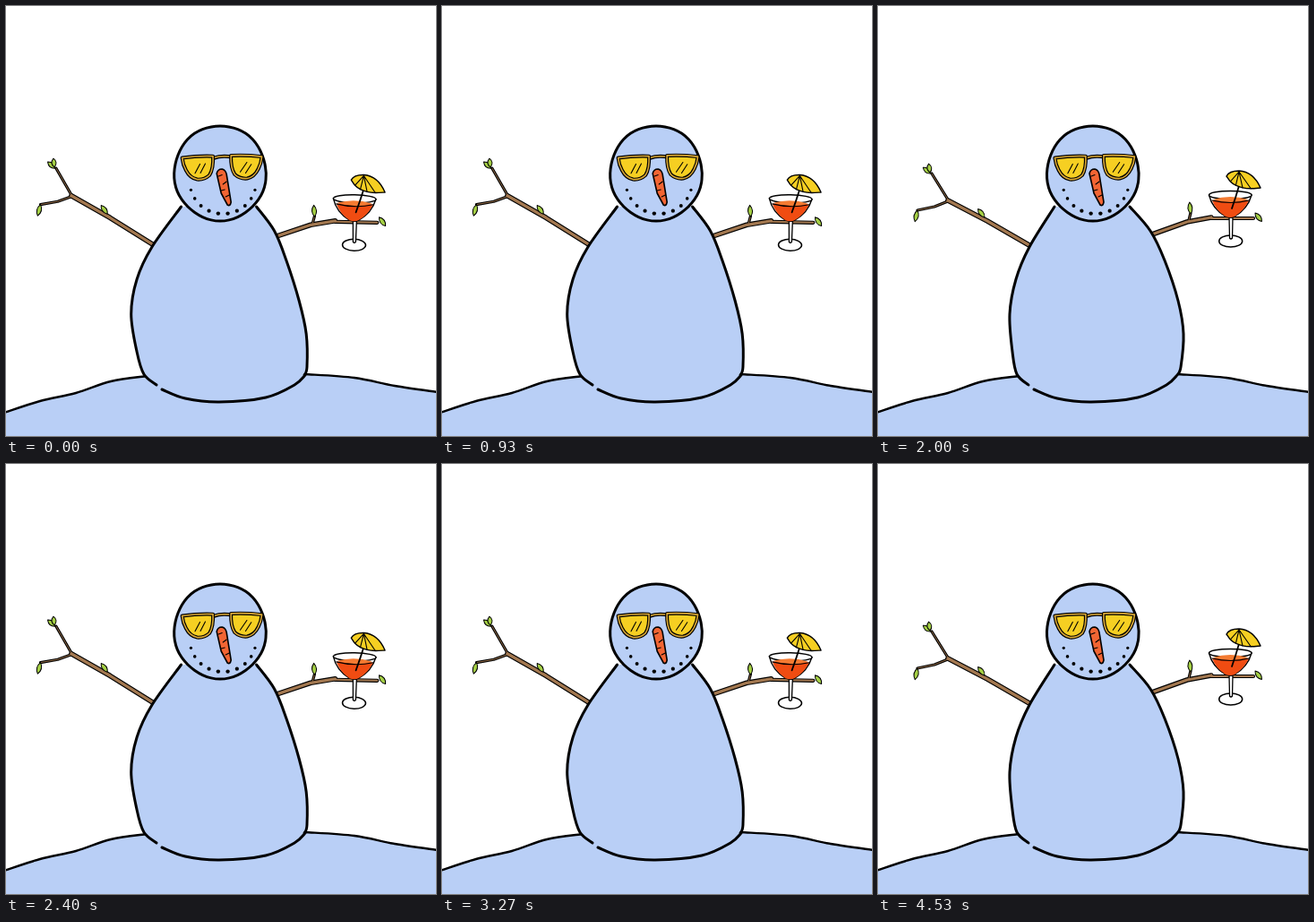
Write an HTML page that moves like this. It is 480 px wide and 480 px high and loops after 4590 ms.

```html
<!DOCTYPE html>
<html lang="en">
<head>
<meta charset="utf-8">
<title>Summer snowman</title>
<style>
html, body { margin: 0; width: 100%; height: 100%; overflow: hidden; background: #fff; }
svg { display: block; width: 100vw; height: 100vh; }
.ink { stroke: #000; stroke-linecap: round; stroke-linejoin: round; }
.line { fill: none; }
.snow { fill: #b9cff6; }
.leaf { fill: #a5d045; stroke-width: 1; }
.bark { stroke: #a37850; }
.gold { stroke: #dba936; }
.thin { stroke-width: 1.1; }
</style>
</head>
<body>
<svg viewBox="0 0 480 480">
  <path id="land" class="snow"/>
  <path id="ridge" class="ink line" stroke-width="2.4"/>
  <g id="armL" class="ink"></g>
  <g id="armR" class="ink">
    <g id="branchR"></g>
    <ellipse cx="393.7" cy="262.500" rx="13" ry="6.5" fill="#fff" stroke-width="1.5"/>
    <path fill="#fff" stroke-width="1.3" d="M392 236 L392.500 259 Q394 261 395.500 259 L396 236Z"/>
    <path fill="#fff" stroke-width="1.4" d="M369.500 211 Q373 226 388 235 Q393 237 398 235 Q413 226 417 211Z"/>
    <path fill="#f04c12" d="M373 217 Q393 211 414 217 Q409 228 398 235 Q393 237 388 235 Q377 228 373 217Z" stroke="none"/>
    <ellipse cx="393.300" cy="211" rx="23.800" ry="4.600" fill="#fff" stroke-width="1.5"/>
    <path fill="#f47b32" stroke="none" d="M374 216 Q393 210 413 216 Q394 222 374 216Z"/>
    <path class="line thin" d="M373 217 Q394 222 414 217"/>
    <path class="line" stroke-width="1.8" d="M405 194 L399 214 L395 226"/>
    <g id="umbrella"></g>
  </g>
  <path id="body" class="snow"/>
  <path id="outline" class="ink line" stroke-width="3"/>
  <g id="head" class="ink">
    <path id="skull" class="snow" stroke-width="3"/>
    <path class="line" stroke-width="4" d="M232 170 Q243 166 254 169"/>
    <path class="line gold" stroke-width="1.6" d="M231 170 Q243 166 255 169"/>
    <g id="shades"></g>
    <path fill="#f26533" stroke-width="1.6" d="M236 187 Q237 182 242 182 Q246 183 247 188 L252 219 Q251 224 248 222 L241 209Z"/>
    <path class="line thin" d="M238 190 L242 188.500 M243 199 L247 196 M241 206 L245 205 M246 213 L250 211"/>
    <g id="smile" stroke="none"></g>
  </g>
</svg>
<script>
const LOOP = 4590, BEAT = LOOP / 12;
const $ = id => document.getElementById(id);
const set = (id, name, value) => $(id).setAttribute(name, value);
const repeat = (n, make) => Array.from({ length: n }, (_, i) => make(i));

// Smooth open curve through [x, y] points.
function curve(pts) {
  const at = i => pts[Math.max(0, Math.min(pts.length - 1, i))];
  let d = "M" + pts[0];
  for (let i = 0; i < pts.length - 1; i++) {
    const [a, b, c, e] = [at(i - 1), at(i), at(i + 1), at(i + 2)];
    const p = b.map((v, k) => v + (c[k] - a[k]) / 6);
    const q = c.map((v, k) => v - (e[k] - b[k]) / 6);
    d += `C${p} ${q} ${c}`;
  }
  return d;
}
const join = (a, b) => a + b.replace("M", "L");

// Each twig is [path, width]; bark goes over all outlines so the forks merge.
function branch(...twigs) {
  const layer = (name, trim) => twigs.map(([d, w]) =>
    `<path class="line ${name}" d="${d}" stroke-width="${w - trim}"/>`).join("");
  return layer("", 0) + layer("bark", 2.3);
}
const leaf = (x, y, turn, size) => `<path class="leaf" transform="translate(${x} ${y}) rotate(${turn})"
  d="M0 0 Q-5 ${-size / 2} 0 ${-size} Q5 ${-size / 2} 0 0"/>`;

function lens(x, y, turn, flip) {
  const d = "M-17.500 -12 Q0 -13.500 17 -12 Q17 2 12 9 Q6 14 -2 13 Q-10 11 -14 2 Q-17 -4 -17.500 -12Z";
  const glare = flip ? "M6 6 L-1 -5 M0 7 L-6 -3" : "M-4 6 L2 -4 M2 6 L8 -4";
  return `<g transform="translate(${x} ${y}) scale(${flip ? -1 : 1} 1) rotate(${turn})">
    <path d="${d}" fill="#f6cf22" stroke-width="4"/>
    <path d="${d}" class="line gold" stroke-width="1.6"/>
    <path class="line thin" d="${glare}"/></g>`;
}

function umbrella() {
  const edge = repeat(6, i => {
    const u = i / 5, v = 1 - u;
    return [389 * v * v + 796 * u * v + 427 * u * u, 190 * v * v + 414 * u * v + 203 * u * u];
  });
  const ribs = edge.slice(1, -1).map(p => `M403 185L${p}`).join("");
  return `<path fill="#f6cf22" stroke-width="1.4" d="${curve(edge)}Q419 185 403 184Q392 184 389 190Z"/>
    <path class="line thin" d="${ribs}"/>`;
}

const hillL = curve([[-2, 454], [38, 441], [78, 432], [117, 419], [157, 413]]);
const hillR = curve([[334, 411], [389, 415], [434, 424], [482, 431]]);
set("ridge", "d", hillL + hillR);
set("land", "d", join(hillL, hillR) + "L482 482 L-2 482Z");

set("skull", "d", curve(repeat(33, i => {
  const a = i / 16 * Math.PI, r = 1 + .008 * Math.sin(5 * a);
  return [239.800 + 51.3 * r * Math.cos(a), 186.7 + 53 * r * Math.sin(a)];
})) + "Z");
$("shades").innerHTML = lens(215.500, 180.500, -3) + lens(268.500, 179.500, -2, true);
$("smile").innerHTML = repeat(10, i => {
  const u = i / 9, a = (165 - 150 * u) * Math.PI / 180;
  return `<circle cx="${243 + 37 * Math.cos(a)}" cy="${196 + 36 * Math.sin(a)}" r="${1.6 + .6 * Math.sin(Math.PI * u)}"/>`;
}).join("");

$("armL").innerHTML = branch(["M174 270 L122 240 L78 217", 5.600], ["M78 216 L60 187", 3.2], ["M78 218 L63 224 L44 228", 3.2])
  + leaf(59, 187, -52, 11) + leaf(58, 186, -8, 10) + leaf(44, 228, 192, 13) + leaf(119, 236, -38, 12);
$("branchR").innerHTML = branch(["M303 256 L345 241 L372 236", 5.600], ["M372 237 L419 237", 4.2], ["M347 239 L349 231", 3.2])
  + leaf(349, 232, -5, 13) + leaf(421, 231, 142, 12);
$("umbrella").innerHTML = umbrella();

const left = [[197, 224], [169, 269], [154, 305], [147, 344], [150, 386], [155, 411], [168, 423]];
const right = [[281, 224], [304, 251], [320, 284], [335, 329], [341, 366], [338, 403], [334, 412]];
const base = [[174, 428], [200, 438], [238, 442], [290, 437], [322, 423], [334, 412]];

// lean 0 is the pose to the right, 1 the pose to the left.
function pose(lean) {
  const bend = ([x, y]) => [x - 8 * lean * Math.max(0, Math.sin(Math.PI * (y - 212) / 208)), y];
  const l = curve(left.map(bend)), r = curve(right.map(bend)), b = curve(base);
  set("outline", "d", l + b + r);
  set("body", "d", join(join(l, b), curve(right.map(bend).reverse())) + "Z");
  set("armL", "transform", `translate(${-7 * lean} ${-2 * lean}) rotate(${2 * lean} 171 270)`);
  set("armR", "transform", `translate(${-5 * lean} ${2.5 * lean}) rotate(${1.2 * lean} 309 255)`);
  set("head", "transform", `translate(${-.8 * lean} 0)`);
}

const start = performance.now();
function tick(now) {
  const time = Math.max(0, now - start) % LOOP;
  pose(Math.floor(time / BEAT) % 2 ? 0 : 1);
  requestAnimationFrame(tick);
}
tick(start);
</script>
</body>
</html>
```
